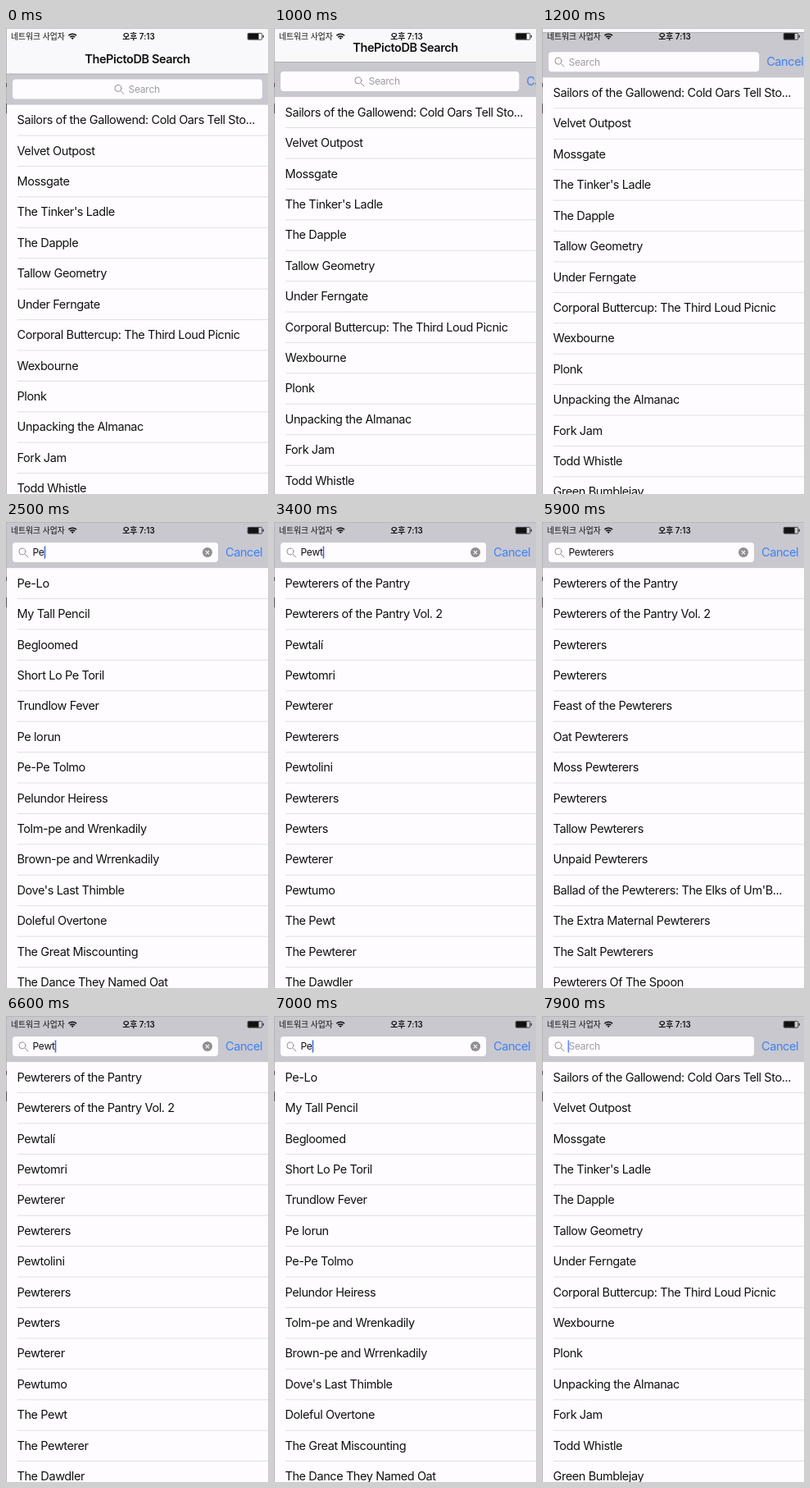
These frames come from a looping animation (320x568 px, 8000 ms). An HTML page:

```html
<!DOCTYPE html>
<html lang="en">
<head>
<meta charset="utf-8">
<title>Movie search</title>
<style>
  html, body { margin: 0; width: 100%; height: 100%; overflow: hidden; background: #fefcfe; }
  svg { display: block; width: 320px; height: 568px; }
  text { font: 14.5px Inter, "Noto Sans CJK KR", "Noto Sans CJK", sans-serif; letter-spacing: -.028em; fill: #111; white-space: pre; }
  .small { font-size: 12px; letter-spacing: -.02em; }
  .status { font-size: 9.8px; letter-spacing: 0; }
  .bold { font-weight: 600; }
  .hint { fill: #9c9ca1; }
  .link { fill: #3b82f7; }
</style>
</head>
<body>
<svg viewBox="0 0 320 568">
  <rect width="320" height="568" fill="#fefcfe"/>
  <g id="list"></g>
  <rect id="bar" width="320" fill="#c9c8ce"/>
  <g id="search">
    <rect id="field" x="8" y="62.5" height="24" rx="4" fill="#fefcfe"/>
    <g id="hint">
      <g fill="none" stroke="#8e8e93" stroke-linecap="round">
        <circle cx="-12.6" cy="73.4" r="4"/>
        <path d="M-9.6 76.4l4 4"/>
      </g>
      <text id="label" class="small hint" y="78.8">Search</text>
    </g>
    <text id="query" class="small" x="32.5" y="78.8"></text>
    <rect id="caret" y="67" width="1.6" height="15" fill="#426bf2"/>
    <g id="clear">
      <circle cx="246" cy="74.6" r="6" fill="#8e8e93"/>
      <path d="M243.8 72.4l4.4 4.4m0-4.4l-4.4 4.4" stroke="#fff" stroke-width="1.1"/>
    </g>
    <text id="cancel" class="link" y="79.7">Cancel</text>
  </g>
  <g id="nav">
    <rect width="320" height="56" fill="#f9f8fa"/>
    <rect y="55.5" width="320" height="1" fill="#b0b0b4"/>
    <text class="bold" x="160.5" y="43" text-anchor="middle">ThePictoDB Search</text>
  </g>
  <text class="status" x="6" y="13.8">네트워크 사업자</text>
  <g fill="none" stroke="#111" stroke-width="1.5">
    <path d="M76.3 9.2a7 7 0 0 1 9.8 0M78.2 11.3a4.3 4.3 0 0 1 6 0"/>
    <path d="M79.6 12.4L81.2 14l1.6-1.6a2.2 2.2 0 0 0-3.2 0z" fill="#111" stroke="none"/>
  </g>
  <text class="status bold" x="162" y="14" text-anchor="middle">오후 7:13</text>
  <rect x="295.2" y="6.4" width="17.6" height="7.8" rx="1.2" fill="none" stroke="#222" stroke-width=".8"/>
  <rect x="295.6" y="6.8" width="13" height="7" fill="#111"/>
  <rect x="313.6" y="8.8" width="1.2" height="3" fill="#222"/>
  <path d="M.5 0V568M0 .4H320" stroke="#b4b4b8" stroke-width=".9"/>
  <path d="M.5 67v5M.5 92v12" stroke="#55555a"/>
</svg>
<script>
const $ = id => document.getElementById(id);
const ROW = 37.42, WORD = 'Pewterers';
const titles = s => s.split('|');
const turn = (a, n) => [...a.slice(n), ...a.slice(0, n)];

const popular = titles("Sailors of the Gallowend: Cold Oars Tell Sto...|Velvet Outpost|Mossgate|The Tinker's Ladle|The Dapple|Tallow Geometry|Under Ferngate|Corporal Buttercup: The Third Loud Picnic|Wexbourne|Plonk|Unpacking the Almanac|Fork Jam|Todd Whistle|Green Bumblejay");
const two = titles("Pe-Lo|My Tall Pencil|Begloomed|Short Lo Pe Toril|Trundlow Fever|Pe lorun|Pe-Pe Tolmo|Pelundor Heiress|Tolm-pe and Wrenkadily|Brown-pe and Wrrenkadily|Dove's Last Thimble|Doleful Overtone|The Great Miscounting|The Dance They Named Oat");
const four = titles("Pewterers of the Pantry|Pewterers of the Pantry Vol. 2|Pewtalí|Pewtomri|Pewterer|Pewterers|Pewtolini|Pewterers|Pewters|Pewterer|Pewtumo|The Pewt|The Pewterer|The Dawdler");
const six = titles("Pewterers of the Pantry|Kettle That|Pewterers of the Pantry Vol. 2|Pewterer|Pewterers|Pewterers|Pewterer|The Pewterer|Moatcub|Pewtering Nell|Feast of the Pewterers|The Unlikely Pewterer|Olumari|P.A.I.L PEWTERER");
const nine = titles("Pewterers of the Pantry|Pewterers of the Pantry Vol. 2|Pewterers|Pewterers|Feast of the Pewterers|Oat Pewterers|Moss Pewterers|Pewterers|Tallow Pewterers|Unpaid Pewterers|Ballad of the Pewterers: The Elks of Um'B...|The Extra Maternal Pewterers|The Salt Pewterers|Pewterers Of The Spoon");

// results by number of letters typed
const results = [popular, turn(two, 5), two, turn(four, 2), four, turn(four, 4), six, turn(six, 2), turn(nine, 2), nine];

// [time, letters in the field]
const keys = [[1300, 0], [1900, 1], [2200, 2], [2700, 3], [3200, 4], [3900, 5], [4500, 6], [4800, 7], [4900, 8], [5100, 9],
  [6000, 8], [6200, 7], [6300, 6], [6400, 5], [6500, 4], [6700, 3], [6900, 2], [7100, 1], [7500, 0]];
const lastKey = t => keys.findLast(k => k[0] <= t) || [0, 0];

$('list').innerHTML = popular.map((_, i) => `<text x="13.5" y="${23.6 + i * ROW}"></text>
  <rect x="14" y="${(i + 1) * ROW - .5}" width="306" height="1" fill="#e0dfe3"/>`).join('');
const rows = [...$('list').querySelectorAll('text')];

const move = (id, x, y) => $(id).setAttribute('transform', `translate(${x} ${y})`);
const clamp = v => Math.min(1, Math.max(0, v));
const lerp = (a, b, p) => a + (b - a) * p;

function caretAlpha(t) {
  const p = t % 1000;
  return p < 520 ? clamp((520 - p) / 150) : clamp((p - 850) / 150);
}

let shown;
function draw(t) {
  const p = (1 - Math.cos(Math.PI * clamp((t - 850) / 450))) / 2;
  const up = -37.5 * p;
  move('list', 0, 93.6 + up);
  move('search', 0, up);
  move('nav', 0, -57 * p);
  move('hint', lerp(149.5, 32.5, clamp(p * 1.15)), 0);
  $('bar').setAttribute('height', 93.6 + up);
  $('field').setAttribute('width', lerp(305, 251, p));
  $('cancel').setAttribute('x', lerp(322, 268, p));

  const [since, count] = lastKey(t);
  $('query').textContent = WORD.slice(0, count);
  $('label').style.opacity = count ? 0 : 1;
  $('clear').style.opacity = count ? 1 : 0;
  $('caret').setAttribute('x', count ? 32.5 + $('query').getComputedTextLength() : 31.5);
  $('caret').style.opacity = since ? caretAlpha(t - since) : 0;

  // results arrive shortly after each key
  const found = results[lastKey(t - 100)[1]];
  if (found !== shown) rows.forEach((row, i) => row.textContent = found[i]);
  shown = found;
}

const start = performance.now();
function frame() {
  draw((performance.now() - start) % 8000);
  requestAnimationFrame(frame);
}
frame();
</script>
</body>
</html>
```
